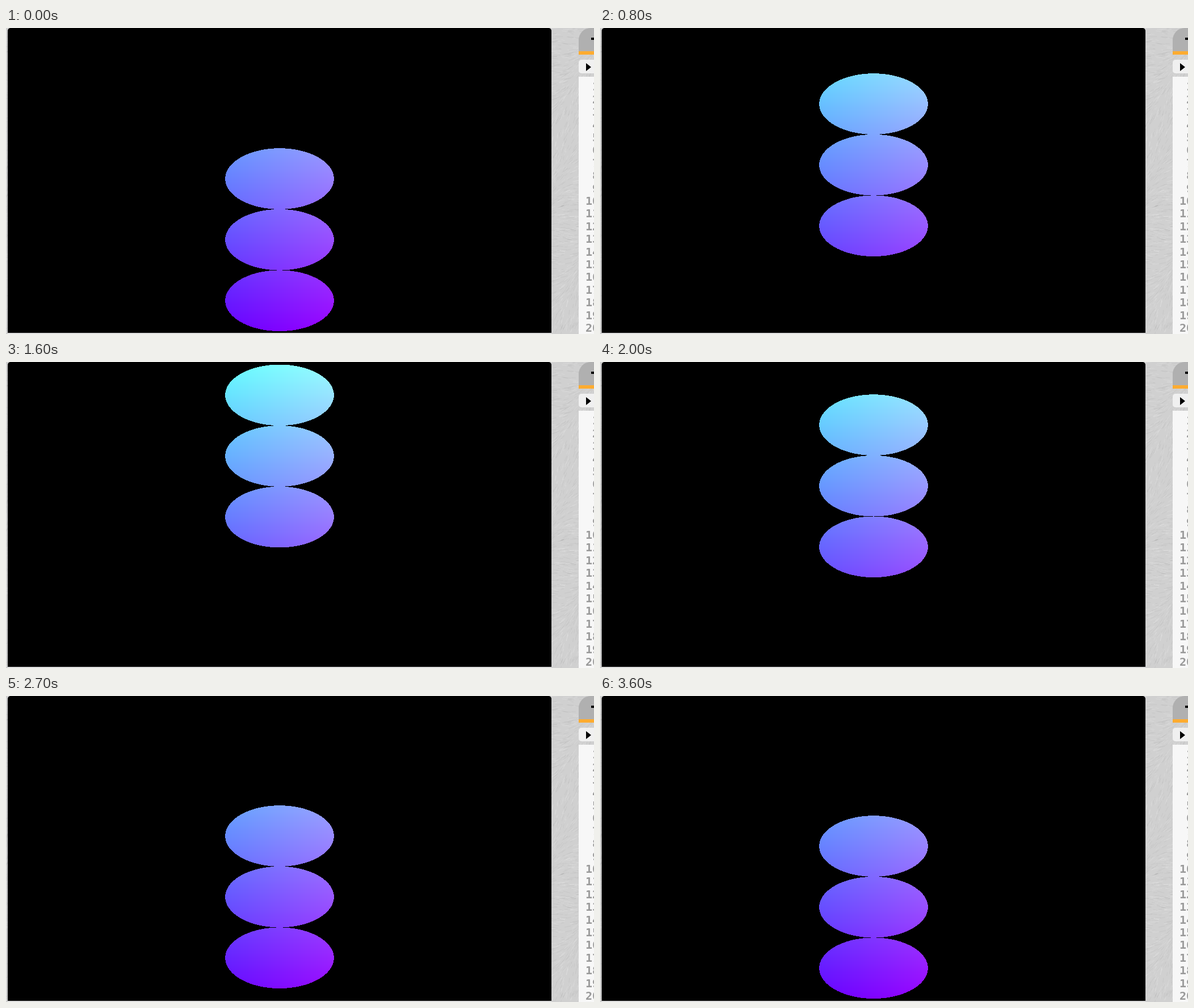
Recreate the animation shown at these times as an HTML page with a canvas. Size 1036 px wide and 540 px high, loop 4250 ms.

```html
<!DOCTYPE html>
<html lang="en">
<head>
<meta charset="utf-8">
<title>Stacked ellipses</title>
<style>
  html, body { margin: 0; width: 100%; height: 100%; overflow: hidden; background: #d0d0d0; }
  canvas, svg { position: absolute; left: 0; top: 0; display: block; }
  #view { left: 3px; background: #000; border-radius: 5px 5px 0 0; }
  text { font: bold 20px "DejaVu Sans Mono", monospace; fill: #999; text-anchor: end; }
</style>
</head>
<body>
<canvas id="fur" width="1036" height="540"></canvas>
<canvas id="view" width="958" height="538"></canvas>
<svg width="1036" height="540">
  <path d="M1009 41V21A21 21 0 0 1 1030 0H1036V41Z" fill="#b0b0b0"/>
  <path d="M1009 41h27v6h-27z" fill="#ffac30"/>
  <path d="M1031 17h5v4h-5z"/>
  <rect x="1009" y="56" width="40" height="24" rx="5" fill="#f0f0f0"/>
  <path d="M1022 62L1031 69L1022 76Z"/>
  <path d="M1009 86h27v454h-27z" fill="#f7f7f7"/>
  <g id="lines"></g>
</svg>
<script>
const W = 958, H = 538, R = 0.1;
const LOOP = 4250, STEP = 100, LAST = 3600;
const X0 = 382, BW = 194;
// time and phase of the bounce
const PHASE = [[0, .118], [400, .514], [800, .914], [1200, 1.321],
               [2000, 2.113], [2700, 2.816], [3000, 3.11], [3600, 3.278]];
const ctx = document.getElementById('view').getContext('2d');
const band = ctx.createImageData(BW, H);

function phaseAt(t) {
  let i = 1;
  while (i < PHASE.length - 1 && t > PHASE[i][0]) i++;
  const [t0, a] = PHASE[i - 1], [t1, b] = PHASE[i];
  return a + (b - a) * (t - t0) / (t1 - t0);
}

// Each lit pixel takes its colour from its own position.
function draw(t) {
  const low = 0.1 + 0.4 * Math.sin(phaseAt(t)) ** 2;
  const d = band.data;
  for (let y = 0, p = 0; y < H; y++) {
    const v = 1 - (y + 0.5) / H;
    const k = Math.max(0, Math.min(2, Math.round((v - low) / 0.2)));
    const dv = v - low - k * 0.2;
    for (let x = 0; x < BW; x++, p += 4) {
      const u = (X0 + x + 0.5) / W;
      const lit = (u - 0.5) ** 2 + dv * dv < R * R;
      d[p] = lit ? u * 255 : 0;
      d[p + 1] = lit ? v * 255 : 0;
      d[p + 2] = lit ? 255 : 0;
      d[p + 3] = 255;
    }
  }
  ctx.putImageData(band, X0, 0);
}

function drawFur() {
  const c = document.getElementById('fur').getContext('2d');
  let seed = 7;
  const rnd = () => (seed = seed * 16807 % 2147483647) / 2147483647;
  c.fillStyle = '#d0d0d0';
  c.fillRect(0, 0, 1036, 540);
  for (let i = 0; i < 1500; i++) {
    const x = i % 8 ? 955 + rnd() * 85 : rnd() * 4, y = rnd() * 540;
    const a = -0.8 + 0.7 * Math.sin(y / 55 + x / 30) + rnd() * 0.4;
    const len = 5 + rnd() * 9;
    c.strokeStyle = rnd() < 0.5 ? 'rgba(255,255,255,.16)' : 'rgba(120,120,120,.1)';
    c.beginPath();
    c.moveTo(x, y);
    c.lineTo(x + len * Math.cos(a), y + len * Math.sin(a));
    c.stroke();
  }
  c.fillStyle = '#dedede';
  c.fillRect(3, 538, 958, 2);
}

function drawLines() {
  let out = '';
  for (let n = 1; n <= 20; n++) {
    out += `<text x="1045" y="${(312 + (n - 10) * 22.4).toFixed(1)}">${n}</text>`;
  }
  document.getElementById('lines').innerHTML = out;
}

let shown = -1;
function tick() {
  const t = Math.min(LAST, Math.floor(performance.now() % LOOP / STEP) * STEP);
  if (t !== shown) draw(shown = t);
  requestAnimationFrame(tick);
}

drawFur();
drawLines();
tick();
</script>
</body>
</html>
```
